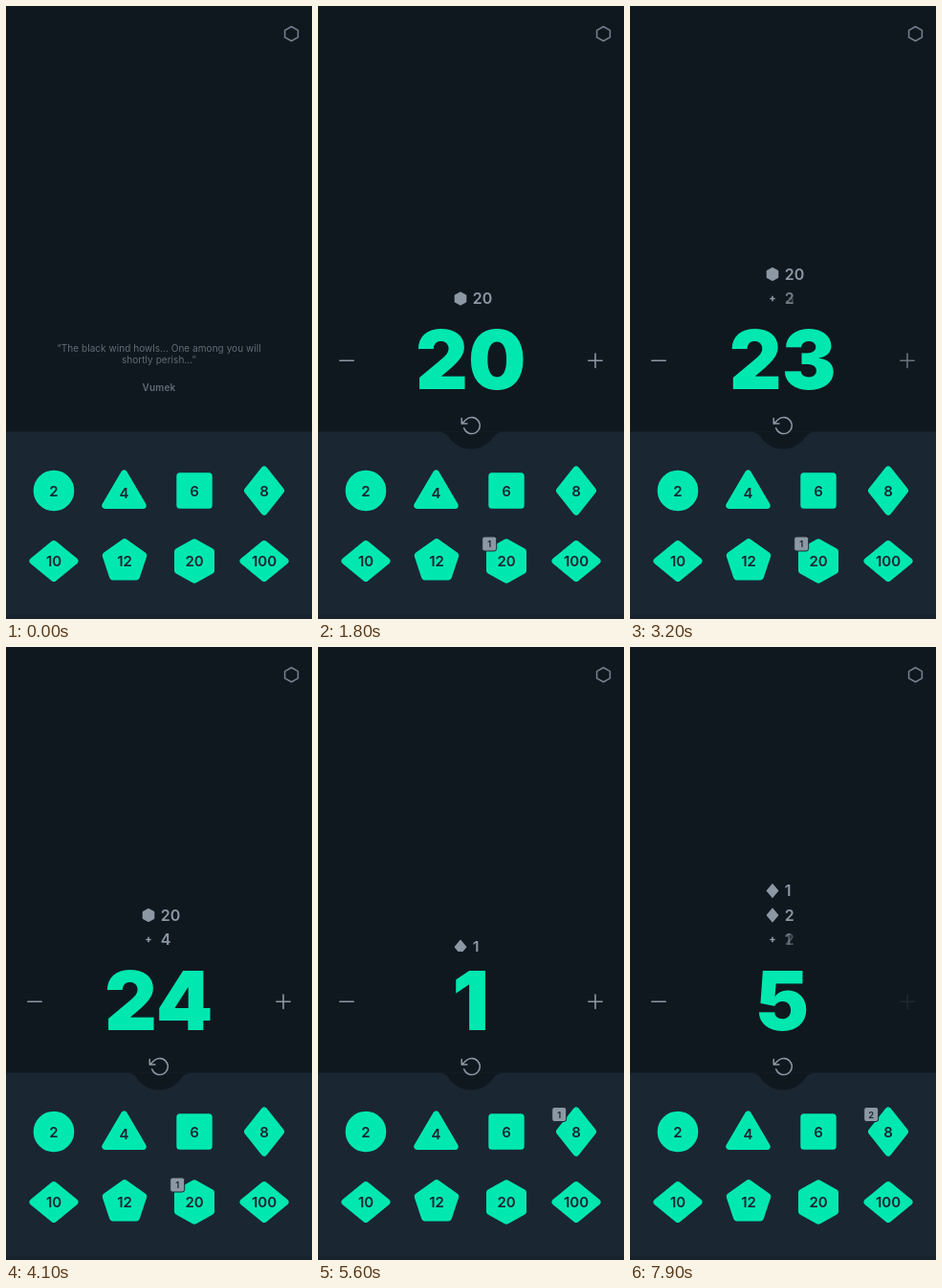
These frames come from a looping animation (320 by 640 pixels, 8 s). An HTML page:

```html
<!DOCTYPE html>
<html lang="en">
<head>
<meta charset="utf-8">
<title>Dice roller</title>
<style>
  html, body { margin: 0; width: 100%; height: 100%; overflow: hidden; background: #10181f; }
  svg { display: block; width: 100%; height: 100%; font-family: Inter, Roboto, sans-serif; }
  text { text-anchor: middle; }
  .die { fill: #00e8b0; stroke: #00e8b0; stroke-width: 7; stroke-linejoin: round; }
  .label { font-size: 15px; font-weight: 600; fill: #1a2632; }
  .line { fill: none; stroke: #8d98a5; stroke-width: 1.6; stroke-linecap: round; stroke-linejoin: round; }
  .row { fill: #8d98a5; font-size: 16px; font-weight: 600; }
  .row text { text-anchor: start; }
  .icon { stroke: #8d98a5; stroke-width: 1.6; stroke-linejoin: round; }
  .quote { fill: #616b76; font-size: 10px; letter-spacing: .05px; }
  .total { fill: #00e8b0; font-size: 85px; font-weight: 900; }
  .badge rect { fill: #8d98a5; stroke: #1a2632; stroke-width: 1; }
  .badge text { fill: #1a2632; font-size: 9.5px; font-weight: 600; }
</style>
</head>
<body>
<svg id="stage" viewBox="0 0 320 640">
  <defs><clipPath id="window"><rect x="100" y="200" width="120" height="118"/></clipPath></defs>
  <rect width="320" height="640" fill="#10181f"/>
  <rect y="444.5" width="320" height="191.5" fill="#1a2632"/>
  <rect y="636" width="320" height="4" fill="#17222c"/>
  <path d="M298.5 21.5l6.9 3.8v7.4l-6.9 3.8l-6.9-3.8v-7.4z" fill="none" stroke="#76818d" stroke-width="1.5" stroke-linejoin="round"/>
  <g id="quote" class="quote">
    <text x="160" y="361">“The black wind howls... One among you will</text>
    <text x="160" y="373">shortly perish...”</text>
    <text x="160" y="401.5" font-weight="600" style="letter-spacing:.2px">Vumek</text>
  </g>
  <g id="dice"></g>
  <g id="result">
    <path d="M127 444.5Q133 445 136.7 450A28 28 0 0 0 183.3 450Q187 445 193 444.5z" fill="#10181f"/>
    <g transform="translate(149.3 426.6) scale(.95)">
      <path class="line" d="M1 4v6h6M3.51 15a9 9 0 1 0 2.13-9.36L1 10"/>
    </g>
    <path class="line" d="M22.8 370.3h14.4"/>
    <path class="line" id="plus" d="M282.8 370.3h14.4M290 363.1v14.4"/>
    <text id="total" class="total" x="159.7" y="400"></text>
    <g clip-path="url(#window)"><g id="rows"></g></g>
    <g id="badge" class="badge">
      <rect x="-7.5" y="-7.5" width="15" height="15" rx="2.5"/>
      <text id="count" y="3.5"></text>
    </g>
  </g>
</svg>
<script>
const LOOP = 8000, PITCH = 25.5, LAST_ROW = 305.5;
const SLIDE = 300, SLIDE_DELAY = 100, COUNT = 290;
const NS = 'http://www.w3.org/2000/svg';
const $ = id => document.getElementById(id);

// Each round: rolls as [time, value], presses of plus, and a reset time.
const rounds = [
  { die: 20, rolls: [[690, 20]], adds: [2528, 2820, 3110, 3400], reset: 4490 },
  { die: 8, rolls: [[5310, 1], [6368, 2]], adds: [7450, 7770], reset: Infinity }
];

const dice = [
  [2, 50, 506, 'M-17.8 0a17.8 17.8 0 1 0 35.6 0a17.8 17.8 0 1 0-35.6 0z'],
  [4, 123.5, 508, 'M0-20L-19.7 13.5H19.7z'],
  [6, 197, 506, 'M-15.2-15.2h30.4v30.4h-30.4z'],
  [8, 270, 506, 'M0-22L17.5 0L0 22L-17.5 0z'],
  [10, 50, 579.5, 'M0-18L22 0L0 18L-22 0z'],
  [12, 124, 579.5, 'M0-20L19.8-5.8L12.4 16.5H-12.4L-19.8-5.8z'],
  [20, 197, 579.5, 'M0-19.7L17.5-10V10L0 19.7L-17.5 10V-10z'],
  [100, 270, 579.5, 'M0-18L22 0L0 18L-22 0z']
];
const icons = {
  20: 'M0-6.3L5.5-3.2V3.2L0 6.3L-5.5 3.2V-3.2z',
  8: 'M0-6.6L5.5 0L0 6.6L-5.5 0z',
  plus: 'M-2.7 0h5.4M0-2.7v5.4'
};

function add(parent, tag, attrs, text) {
  const el = document.createElementNS(NS, tag);
  for (const key in attrs) el.setAttribute(key, attrs[key]);
  if (text !== undefined) el.textContent = text;
  parent.appendChild(el);
  return el;
}
const clamp = v => Math.max(0, Math.min(1, v));
const ramp = (t, from, length) => clamp((t - from) / length);
const smooth = u => u * u * (3 - 2 * u);
const easeOut = u => 1 - (1 - u) * (1 - u);

for (const [sides, x, y, d] of dice) {
  const g = add($('dice'), 'g', { transform: `translate(${x} ${y})` });
  add(g, 'path', { class: 'die', d });
  add(g, 'text', { class: 'label', y: 5.5 }, sides);
}

function addRow(icon, y, values) {
  const g = add($('rows'), 'g', { class: 'row', transform: `translate(149 ${y})` });
  add(g, 'path', { class: 'icon', d: icons[icon] });
  for (const [value, opacity] of values) {
    add(g, 'text', { x: 12.8, y: 5.8, opacity }, value);
  }
}

function drawRows(round, rolls, adds, t) {
  const starts = rolls.map(([at]) => at + SLIDE_DELAY);
  if (adds.length) starts.push(adds[0]);
  const shown = starts.filter(at => t >= at);
  const n = shown.length;
  $('rows').replaceChildren();
  if (!n) return;
  const shift = PITCH * (1 - smooth(ramp(t, shown[n - 1], SLIDE)));
  const rowY = i => LAST_ROW - PITCH * (n - 1 - i) + shift;
  rolls.forEach(([, value], i) => {
    if (i < n) addRow(round.die, rowY(i), [[value, 1]]);
  });
  if (adds.length) {
    const m = adds.length;
    const k = m > 1 ? ramp(t, adds[m - 1], SLIDE) : 1;
    addRow('plus', rowY(n - 1), k < 1 ? [[m - 1, 1 - k], [m, k]] : [[m, 1]]);
  }
}

function draw(t) {
  const round = rounds.filter(r => t >= r.rolls[0][0]).pop();
  const shown = round
    ? ramp(t, round.rolls[0][0], 150) * (1 - ramp(t, round.reset, 290))
    : 0;
  $('result').setAttribute('opacity', shown);
  $('quote').setAttribute('opacity', 1 - shown);
  if (!round) return;

  const rolls = round.rolls.filter(([at]) => t >= at);
  const adds = round.adds.filter(at => t >= at);
  const sum = rolls.reduce((s, [at, v]) => s + v * easeOut(ramp(t, at, COUNT)), 0);
  $('total').textContent = Math.floor(sum + 1e-6) + adds.length;

  const press = adds.length ? t - adds[adds.length - 1] : Infinity;
  const dim = ramp(press, 75, 50) * (1 - ramp(press, 160, 200));
  $('plus').setAttribute('opacity', 1 - 0.88 * dim);

  const [, x, y] = dice.find(d => d[0] === round.die);
  $('badge').setAttribute('transform', `translate(${x - 17.8} ${y - 18})`);
  $('count').textContent = rolls.length;
  drawRows(round, rolls, adds, t);
}

const start = performance.now();
function tick() {
  draw((performance.now() - start) % LOOP);
  requestAnimationFrame(tick);
}
tick();
</script>
</body>
</html>
```
